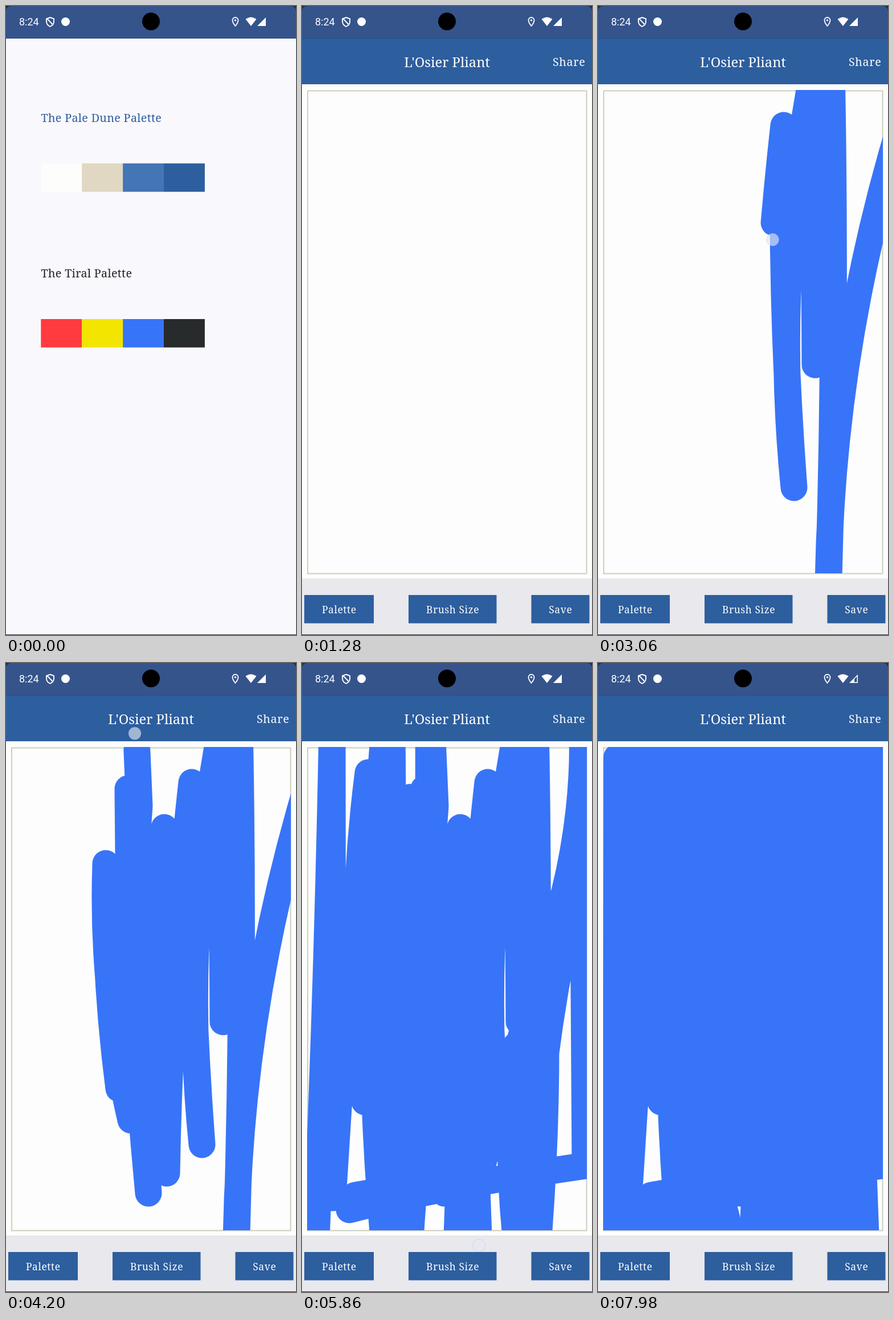
An HTML page that plays this animation: 509 px wide and 1101 px high, repeating every 8 s.

```html
<!DOCTYPE html>
<html lang="en">
<head>
<meta charset="utf-8">
<title>Paint app</title>
<style>
  html, body { margin: 0; width: 100%; height: 100%; overflow: hidden; background: #000; }
  svg { display: block; width: 100vw; height: 100vh; }
  text { font-family: "Noto Serif", serif; fill: #fff; }
  .button { font-size: 17.4px; letter-spacing: .6px; text-anchor: middle; }
  .heading { font-size: 19.8px; letter-spacing: .31px; }
</style>
</head>
<body>
<svg viewBox="0 0 509 1101" preserveAspectRatio="none">
  <defs>
    <clipPath id="paper"><rect x="9" y="147" width="491" height="846"/></clipPath>
    <clipPath id="screen"><path d="M0 10Q0 0 10 0H499Q509 0 509 10V1100H0Z"/></clipPath>
  </defs>
  <rect width="509" height="1101" fill="#2b2c30"/>
  <g clip-path="url(#screen)">
    <rect y="57" width="509" height="1044" fill="#fdfdfb"/>
    <rect y="57" width="509" height="80" fill="#2d5e9e"/>
    <text x="254.5" y="107" font-size="23.7" text-anchor="middle">L'Osier Pliant</text>
    <text x="440" y="105" font-size="19.8" letter-spacing=".6">Share</text>
    <rect x="10" y="148.5" width="489.5" height="845" fill="#fdfdfd" stroke="#cdcec1" stroke-width="2"/>
    <g clip-path="url(#paper)">
      <path id="paint" fill="none" stroke="#3874f8" stroke-width="47" stroke-linecap="round" stroke-linejoin="round"/>
    </g>
    <rect y="1002" width="509" height="99" fill="#e8e8ed"/>
    <g id="buttons"></g>
    <circle id="finger" r="11" fill="#e6e9f2" fill-opacity=".63" stroke="#8db4e4" stroke-opacity=".3"/>
    <g id="sheet">
      <rect y="57" width="509" height="1044" fill="#f9f8fc"/>
      <text class="heading" x="61.5" y="203" style="fill:#2d5d9e">The Pale Dune Palette</text>
      <text class="heading" x="61.5" y="475" style="fill:#202226">The Tiral Palette</text>
      <g id="swatches"></g>
    </g>
    <rect width="509" height="57" fill="#35548c"/>
    <rect y="56" width="509" height="1" fill="#2b4b82"/>
    <text x="23" y="34" font-size="18" style="font-family:Roboto,sans-serif">8:24</text>
    <path d="M77.500 20L84 22.500V27Q84 33 77.500 36Q71 33 71 27V22.500ZM72 22L82.500 33" fill="none" stroke="#fff" stroke-width="1.900"/>
    <circle cx="104.500" cy="27.500" r="7.500" fill="#fff"/>
    <circle cx="254.500" cy="27" r="15.500"/>
    <path d="M402.500 35Q397.500 29 397.500 25A5 5 0 0 1 407.500 25Q407.500 29 402.500 35Z" fill="none" stroke="#fff" stroke-width="1.800"/>
    <circle cx="402.500" cy="25" r="1.800" fill="#fff"/>
    <path d="M420.500 23Q430 16 439.500 23L430 35Z" fill="#fff"/>
    <path d="M441 35L456 20V35Z" fill="#fff"/>
    <path id="weakSignal" d="M450 28L454.500 23.500V33.500H450Z" fill="#35548c"/>
  </g>
</svg>
<script>
const LOOP = 8000, START = 1950, LIFT = 7850, LEAD = 30;
const byId = id => document.getElementById(id);
const paint = byId("paint"), finger = byId("finger"), sheet = byId("sheet");

function add(parent, tag, attrs, text = "") {
  const node = document.createElementNS("http://www.w3.org/2000/svg", tag);
  for (const key in attrs) node.setAttribute(key, attrs[key]);
  node.textContent = text;
  byId(parent).append(node);
}

[["Palette", 4, 122], ["Brush Size", 187, 154.5], ["Save", 402.5, 102]].forEach(([label, x, width]) => {
  add("buttons", "rect", { x, y: 1031, width, height: 49.5, fill: "#2d5e9e" });
  add("buttons", "text", { class: "button", x: x + width / 2 + .3, y: 1063 }, label);
});

[[275.5, "#fdfdfb", "#e0d8c2", "#4475b4", "#2d5f9f"],
 [548, "#ff3b3f", "#f3e500", "#3874f8", "#272b2b"]].forEach(([y, ...colors]) =>
  colors.forEach((fill, i) => add("swatches", "rect", { x: 61.3 + i * 71.9, y, width: 71.9, height: 49.7, fill })));

// The finger scribbles one long line; each pass bends sideways by its bow.
let pen = [533, 200];
let route = `M${pen}`;
const knots = [[START, 0]];

function pass(x, y, bow = 0) {
  route += `Q${(pen[0] + x) / 2 + bow} ${(pen[1] + y) / 2} ${x} ${y}`;
  pen = [x, y];
}

function sweep(from, to, step, firstY, secondY) {
  const count = Math.round(Math.abs(to - from) / step);
  for (let i = 0; i <= count; i++) pass(from + (to - from) * i / count, i % 2 ? secondY : firstY);
}

function reachedAt(time) {
  paint.setAttribute("d", route);
  knots.push([time, paint.getTotalLength()]);
}

const TOP = 110, BOTTOM = 1030;

// Right edge, then leftwards to the middle
pass(404, BOTTOM, -62);
pass(410, TOP, 12);
pass(381, 628);
pass(378, TOP);
pass(344, 843, -54);
pass(326, 209, -15);
pass(282, 893, -16);
pass(278, 288);
pass(250, 928, -40);
pass(214, 220, -16);
pass(219, 800);
pass(175, 351, -30);
pass(198, 745, -14);
pass(234, 250);
pass(229, 133);
reachedAt(4200);

// Left half, then back under the page to the right
pass(222, TOP);
pass(188, BOTTOM, 20);
pass(190, 235);
pass(165, BOTTOM);
pass(158, TOP);
pass(145, TOP);
pass(145, BOTTOM, -42);
pass(116, 192);
pass(110, 768, -34);
pass(88, 400);
pass(54, 936);
pass(53, TOP);
pass(24, BOTTOM, 6);
pass(413, BOTTOM);
pass(428, 660, 8);
pass(375, 670);
pass(378, BOTTOM, -20);
pass(361, 744);
reachedAt(5180);

// Lower gaps, right margin, lower right block
pass(222, 910);
pass(93, 932);
pass(83, 957);
pass(497, 880, -60);
pass(492, TOP);
pass(461, 400, 20);
sweep(271, 471, 20, BOTTOM, 480);
pass(450, 1052);
reachedAt(6700);

// Remaining white along the bottom, the left margin and the top
sweep(240, 32, 20, BOTTOM, 945);
pass(33, 165);
sweep(50, 470, 18, 150, 400);
reachedAt(LIFT);

function travelled(t) {
  for (let i = 1; i < knots.length; i++) {
    const [t0, d0] = knots[i - 1], [t1, d1] = knots[i];
    if (t < t1) return d0 + (d1 - d0) * Math.max(0, (t - t0) / (t1 - t0));
  }
  return knots[knots.length - 1][1] + LEAD;
}

function draw(t) {
  const slide = Math.min(1, Math.max(0, (t - 200) / 300));
  sheet.setAttribute("transform", `translate(0 ${1044 * slide * slide})`);

  const distance = travelled(t), tip = Math.max(0, distance - LEAD);
  paint.style.display = tip > 0 ? "" : "none";
  paint.setAttribute("stroke-dasharray", `${tip} 99999`);

  const touching = t >= START && t < LIFT;
  finger.style.display = touching ? "" : "none";
  if (touching) {
    const { x, y } = paint.getPointAtLength(distance);
    finger.setAttribute("cx", x);
    finger.setAttribute("cy", y);
  }
  byId("weakSignal").style.display = t >= 6000 ? "" : "none";
}

const began = performance.now();
function frame() {
  draw((performance.now() - began) % LOOP);
  requestAnimationFrame(frame);
}
frame();
</script>
</body>
</html>
```
